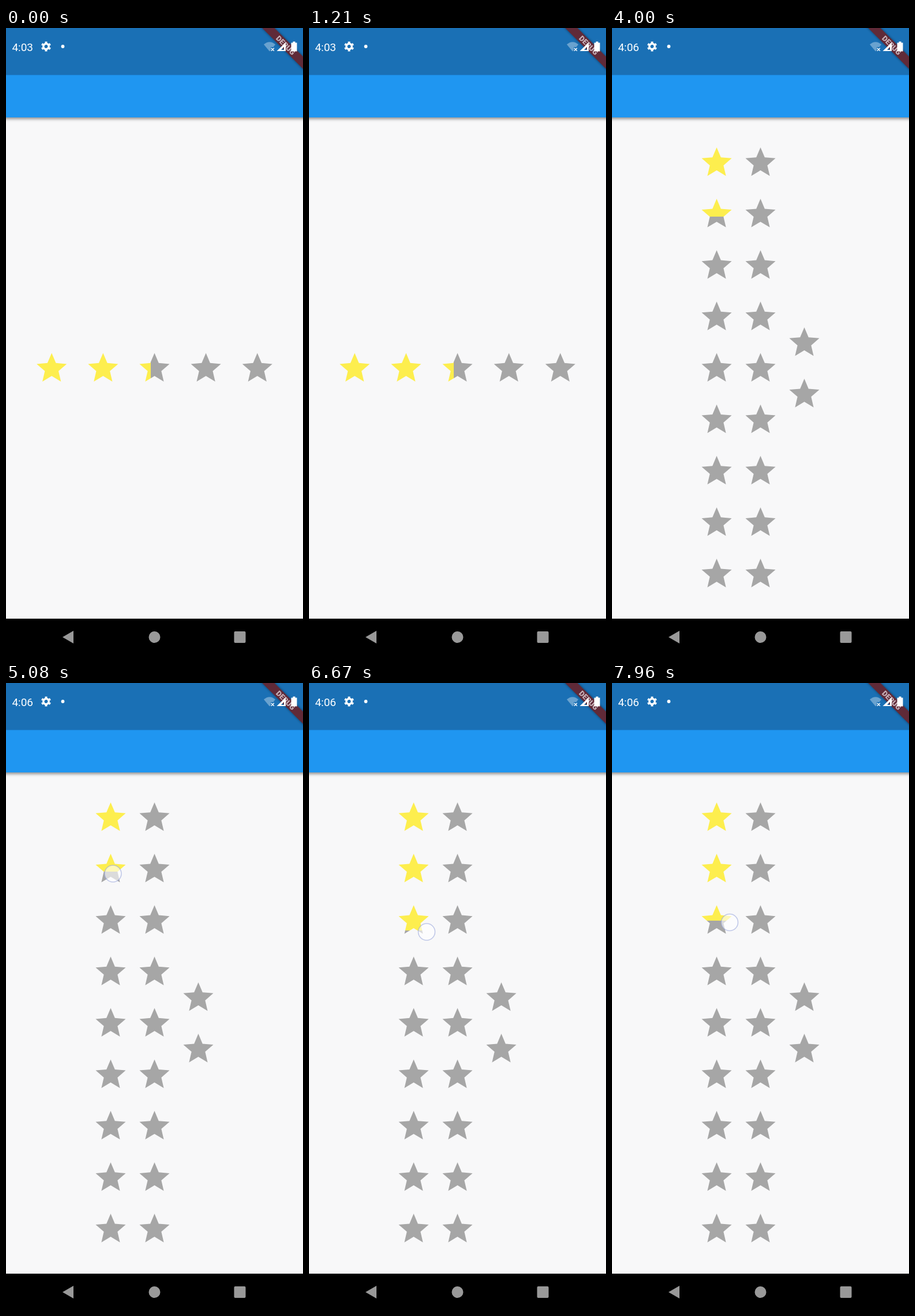
Recreate the animation shown at these times as an HTML page. Size 515 px wide and 1087 px high, loop 8000 ms.

```html
<!DOCTYPE html>
<html lang="en">
<head>
<meta charset="utf-8">
<title>Star rating</title>
<style>
  html, body { margin: 0; width: 100%; height: 100%; overflow: hidden; background: #f8f8f9; }
  svg { display: block; width: 100%; height: 100%; }
  text { font-family: Roboto, sans-serif; }
  #appBar { filter: drop-shadow(0 3px 2.5px rgba(0, 0, 0, .4)); }
  #ribbon rect { filter: drop-shadow(0 0 2px rgba(0, 0, 0, .5)); }
</style>
</head>
<body>
<svg viewBox="0 0 515 1087">
  <defs>
    <linearGradient id="rating" gradientUnits="userSpaceOnUse" x1="0" y1="0">
      <stop class="edge" stop-color="#fdee4e"/>
      <stop class="edge" stop-color="#a6a6a6"/>
    </linearGradient>
  </defs>

  <rect width="515" height="1087" fill="#f8f8f9"/>
  <rect id="appBar" x="-9" y="70" width="533" height="85" fill="#1f96f1"/>
  <rect width="515" height="81.5" fill="#1a70b5"/>

  <path id="rated" fill="url(#rating)"/>
  <path id="unrated" fill="#a6a6a6"/>
  <circle id="touch" r="14.5" fill="#fff" fill-opacity=".6" stroke="#9aa6dc" stroke-opacity=".6" stroke-width="1.6"/>

  <g id="ribbon" transform="translate(515 0) rotate(45)">
    <rect x="-60" y="35" width="120" height="15" fill="#602a38"/>
    <text y="47" text-anchor="middle" font-size="12.8" font-weight="900" fill="#c9b3ba">DEBUG</text>
  </g>

  <!-- status bar -->
  <g fill="#fff">
    <text id="clock" x="10.4" y="39.8" font-size="19"></text>
    <g transform="translate(69.5 32) rotate(15)" fill="none" stroke="#fff">
      <circle r="4.7" stroke-width="3.4"/>
      <circle r="7.2" stroke-width="2.8" pathLength="12" stroke-dasharray="1"/>
    </g>
    <circle cx="98.5" cy="32" r="2.9"/>
    <path d="M447 28.5Q457 20 467 28.5L463.5 33H459V38.5L457 40.5z" opacity=".35"/>
    <path d="M459.8 34.8l5 5m0-5l-5 5" stroke="#fff" stroke-width="1.5"/>
    <path d="M485 25V40H469.5zM482 32.5V38H477z" fill-rule="evenodd"/>
    <path d="M497.5 25.5V23.5H501.5V25.5H504.5V40.5H494.5V25.5z"/>
  </g>

  <!-- navigation bar -->
  <rect y="1024" width="515" height="63"/>
  <g fill="#999">
    <path d="M98 1056 117 1045V1067z"/>
    <circle cx="257.5" cy="1056" r="10"/>
    <rect x="395.5" y="1046" width="20" height="20" rx="2"/>
  </g>
</svg>
<script>
const $ = id => document.getElementById(id);
const set = (el, attrs) => Object.entries(attrs).forEach(([k, v]) => el.setAttribute(k, v));

const LOOP = 8000, SWITCH = 1500;
const CX = 257.5, CY = 590.9, PITCH = 89.15, COLUMN = 76;
const OUTER = 27.4, INNER = 12.45;

function star(x, y) {
  const points = Array.from({ length: 10 }, (_, i) => {
    const r = i % 2 ? INNER : OUTER, a = i * Math.PI / 5;
    return `${x + r * Math.sin(a)} ${y - r * Math.cos(a)}`;
  });
  return `M${points.join("L")}z`;
}

// A centred line of n stars; place(d) maps the offset along it to a star.
const line = (n, place) =>
  Array.from({ length: n }, (_, i) => place((i - (n - 1) / 2) * PITCH)).join("");
const row = line(5, d => star(CX + d, CY));
const column = (n, k) => line(n, d => star(CX + k * COLUMN, CY + d));
const scenes = {
  "4:03": { rated: row, unrated: "", axis: { x2: 1087, y2: 0 } },
  "4:06": { rated: column(9, -1), unrated: column(9, 0) + column(2, 1), axis: { x2: 0, y2: 1087 } }
};

let shown;
function showScene(clock) {
  if (shown === clock) return;
  shown = clock;
  const { rated, unrated, axis } = scenes[clock];
  set($("rated"), { d: rated });
  set($("unrated"), { d: unrated });
  set($("rating"), axis);
  $("clock").textContent = clock;
}

function ease(t, from, to) {
  const p = Math.min(1, Math.max(0, (t - from) / (to - from)));
  return p * p * (3 - 2 * p);
}
const tap = (t, at) => ease(t, at - 120, at) * (1 - ease(t, at, at + 150));

// Two taps, then a drag down and a little way back.
function finger(t) {
  const drag = ease(t, 5400, 6670);
  return {
    x: 185.5 + 18.5 * drag,
    y: 241.5 + 89 * ease(t, 3220, 3240) + 101 * drag - 16.5 * ease(t, 6700, 7960),
    opacity: .6 * tap(t, 2130) + tap(t, 3320) + ease(t, 4860, 4960)
  };
}

function draw(now) {
  const t = now % LOOP, vertical = t >= SWITCH;
  showScene(vertical ? "4:06" : "4:03");
  const { x, y, opacity } = finger(t);
  const edge = !vertical ? 251 : t < 2050 ? 0 : y - 3;
  document.querySelectorAll(".edge").forEach(stop => set(stop, { offset: edge / 1087 }));
  set($("touch"), { cx: x, cy: y, opacity });
  requestAnimationFrame(draw);
}
draw(0);
</script>
</body>
</html>
```
